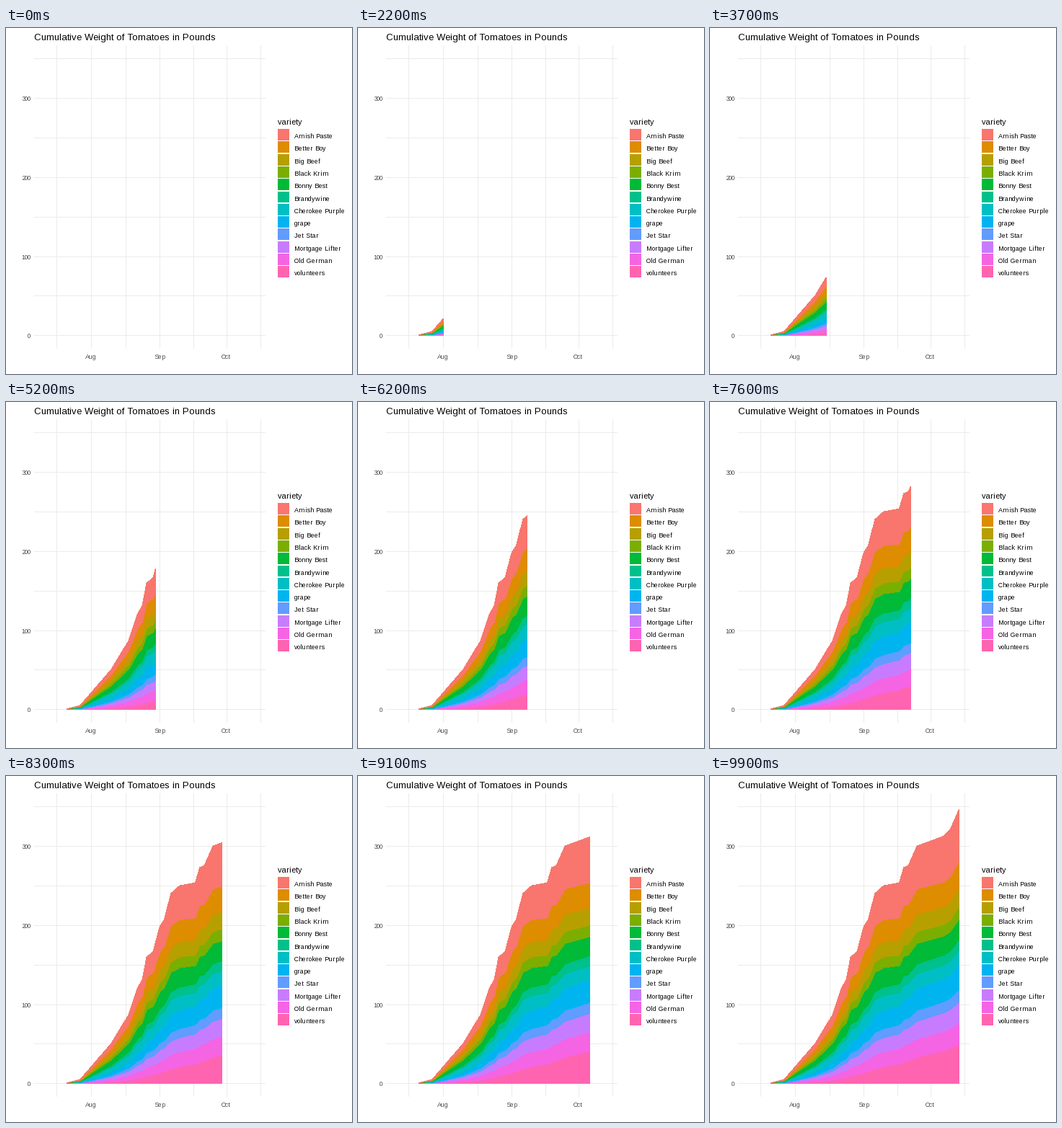
A matplotlib script that plays this animation: 480x480 px, repeating every 10000 ms.

```python
import math

import matplotlib.pyplot as plt
import numpy as np
from matplotlib.animation import FuncAnimation
from matplotlib.patches import Polygon, Rectangle

SIZE, DPI = 480, 100
FRAMES, INTERVAL = 100, 100
LEFT, RIGHT, TOP, BOTTOM = 39, 360, 24, 445
DAY_ZERO_X, DAY_WIDTH = 53.53, 3.075
BASE_Y, POUND_HEIGHT = 426.2, 1.0965
FIRST_HARVEST, LAST_DAY = 10, 95
KEY_TOP, KEY_PITCH, KEY_HEIGHT = 140.12, 17.28, 15.9

# name, colour, final pounds, lateness (above 0: most of it ripens late)
VARIETIES = [
    ("Amish Paste", "#F8766D", 65, 0.25),
    ("Better Boy", "#DE8C00", 34, -0.25),
    ("Big Beef", "#B79F00", 24, -0.2),
    ("Black Krim", "#7CAE00", 15.5, -0.4),
    ("Bonny Best", "#00BA38", 25.5, -0.6),
    ("Brandywine", "#00C08B", 14, -0.15),
    ("Cherokee Purple", "#00BFC4", 17.5, -0.75),
    ("grape", "#00B4F0", 32, 0),
    ("Jet Star", "#619CFF", 15.5, 0),
    ("Mortgage Lifter", "#C77CFF", 26, 0.15),
    ("Old German", "#F564E3", 27, 0.1),
    ("volunteers", "#FF64B0", 50, 1.3),
]

# Days where the harvest speeds up or slows down, with the pounds so far
TURNS = [(10, 0.5), (16, 4.5), (22, 24), (30, 50), (38, 87), (42, 121),
         (44, 130), (46, 159), (49, 167), (52, 198.5), (54, 207), (57, 240),
         (61, 250), (68, 253.5), (70, 273), (72, 275), (76, 300),
         (88, 312.5), (91, 321), (95, 346.6)]


def nearest(value):
    return math.floor(value + 0.5)


def day_x(day):
    return DAY_ZERO_X + DAY_WIDTH * day


def pound_y(pounds):
    return BASE_Y - POUND_HEIGHT * pounds


def stack_edges():
    """Heights of the layer borders for every day, bottom first."""
    total = np.interp(days, *zip(*TURNS))
    weights = np.array([final * (days / LAST_DAY) ** lateness
                        for _, _, final, lateness in reversed(VARIETIES)])
    shares = weights / weights.sum(axis=0)
    borders = np.vstack([np.zeros(len(days)), np.cumsum(shares, axis=0)])
    return pound_y(borders * total)


def label(x, y, text, px, color="black", align="left"):
    ax.text(x, y, text, fontsize=px * 72 / DPI, color=color, ha=align,
            va="baseline", family="Liberation Sans")


def box(x, y, width, height, color, zorder=1):
    ax.add_patch(Rectangle((x, y), width, height, lw=0, fc=color,
                           antialiased=False, zorder=zorder))


def draw_panel():
    grid, axis_text = "#EBEBEB", "#4D4D4D"
    for pounds in range(0, 351, 50):
        y = nearest(pound_y(pounds))
        box(LEFT, y, RIGHT - LEFT, 1, grid)
        if pounds % 100 == 0:
            label(34, y + 4, str(pounds), 9, axis_text, "right")
    months = [-10, 21, 52, 82, 113]
    middles = [(a + b) / 2 for a, b in zip(months, months[1:])]
    for day in months[1:4] + middles:
        box(nearest(day_x(day)), TOP, 1, BOTTOM - TOP, grid)
    for day, name in zip(months[1:4], ("Aug", "Sep", "Oct")):
        label(day_x(day), 459, name, 9, axis_text, "center")
    label(LEFT, 17, "Cumulative Weight of Tomatoes in Pounds", 13)


def draw_legend():
    label(377, 134, "variety", 11)
    for i, (name, color, *_) in enumerate(VARIETIES):
        top = KEY_TOP + KEY_PITCH * i
        start, end = nearest(top), nearest(top + KEY_HEIGHT)
        box(377, start, 16, end - start, color)
        label(400, nearest(top + 13), name, 9)


def update(frame):
    # The reveal advances in whole days
    day = math.floor(LAST_DAY * frame / (FRAMES - 1) + 0.49)
    count = day - FIRST_HARVEST + 1
    xs = day_x(days[:max(count, 0)])
    for layer, low, high in zip(layers, edges, edges[1:]):
        layer.set_visible(count > 1)
        if count > 1:
            layer.set_xy(np.column_stack([
                np.concatenate([xs, xs[::-1]]),
                np.concatenate([high[:count], low[:count][::-1]])]))
    return layers


# Whole-pixel glyph widths, as in small screen text
plt.rcParams.update({"text.hinting": "force_autohint",
                     "text.hinting_factor": 1})
fig = plt.figure(figsize=(SIZE / DPI, SIZE / DPI), dpi=DPI, facecolor="white")
ax = fig.add_axes([0, 0, 1, 1])
ax.set(xlim=(0, SIZE), ylim=(SIZE, 0))
ax.axis("off")

days = np.arange(FIRST_HARVEST, LAST_DAY + 1)
edges = stack_edges()
draw_panel()
draw_legend()
layers = [ax.add_patch(Polygon([(0, 0)] * 3, fc=color, lw=0, zorder=2,
                               antialiased=False, visible=False))
          for _, color, *_ in reversed(VARIETIES)]

anim = FuncAnimation(fig, update, frames=FRAMES, interval=INTERVAL,
                     repeat=True, repeat_delay=0, blit=False)
plt.show()
```
